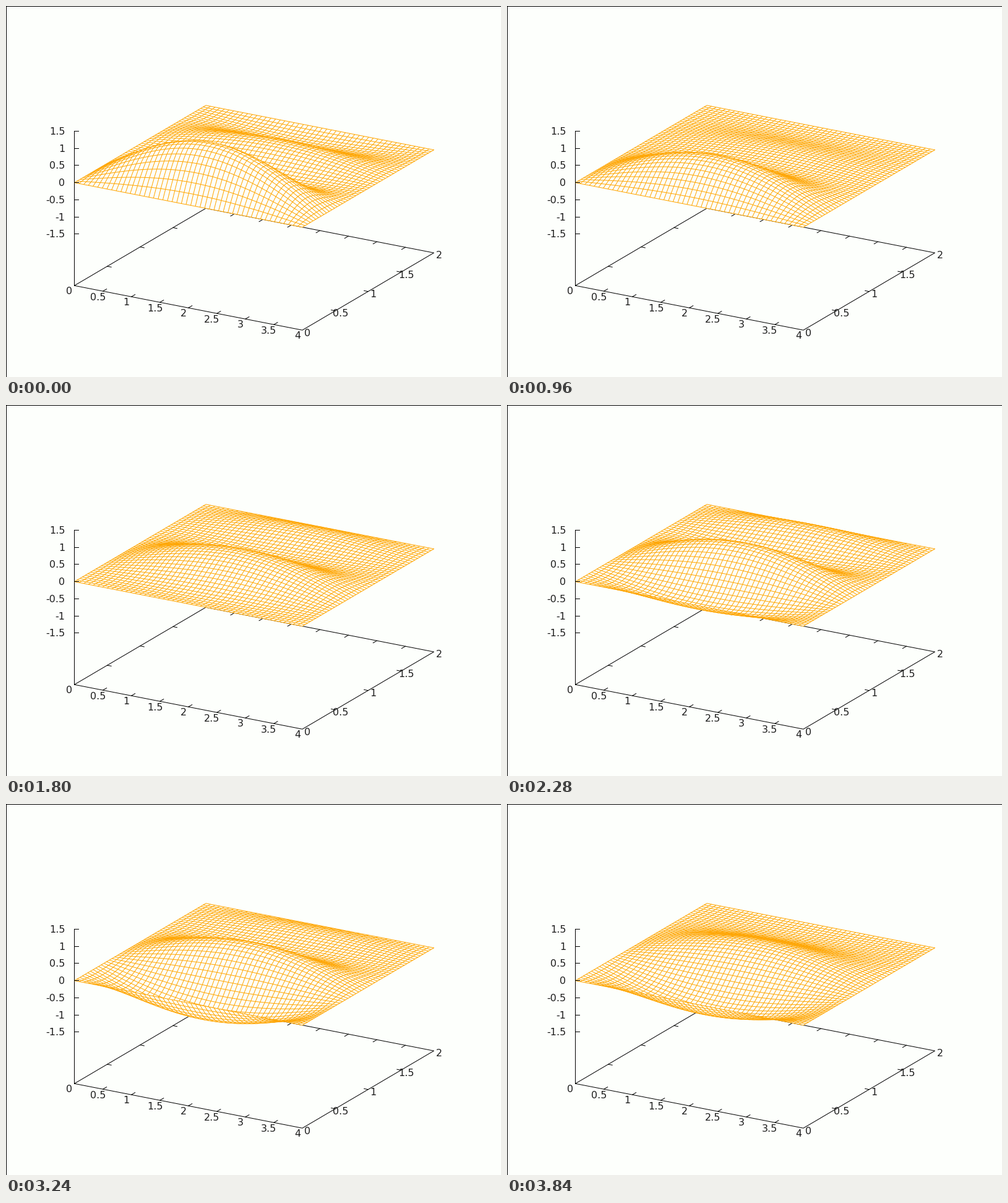
A matplotlib script for the animation above (3960 ms loop, 800 by 600 pixels).

```python
import numpy as np
import matplotlib.pyplot as plt
from matplotlib.animation import FuncAnimation
from matplotlib.collections import PolyCollection

W, H, DPI = 800, 600, 100
FRAMES, INTERVAL = 33, 120
BG, ORANGE, INK = "#fdfffc", "#ffa500", "#1c1c1c"
LINE = 72 / DPI                      # one pixel, in points
LX, LY = 4, 2                        # membrane size
SAMPLES = 50
MODES = np.arange(1, 5)
AMP = 0.44
SPEED, DT = np.sqrt(5), 0.01
ZBASE = -3


def project(x, y, z):
    """Orthographic view: plot coordinates to pixels."""
    px = 110 + 92.12 * x + 106.25 * y
    py = 285.2 + 18.0 * x - 62.5 * y - 55.5 * z
    return px, py


def height(x, y, t):
    """Sum of the first modes across y, all with one half wave along x."""
    total = 0
    for n in MODES:
        omega = SPEED * np.pi * np.hypot(1 / LX, n / LY)
        total = total + np.sin(n * np.pi * y / LY) * np.cos(omega * t)
    return AMP * np.sin(np.pi * x / LX) * total


fig = plt.figure(figsize=(W / DPI, H / DPI), dpi=DPI, facecolor=BG)
ax = fig.add_axes([0, 0, 1, 1])
# Whole numbers fall on pixel centres
ax.set_xlim(-0.5, W - 0.5)
ax.set_ylim(H - 0.5, -0.5)
ax.axis("off")


def stroke(points, color="black", zorder=1):
    xs, ys = zip(*points)
    ax.plot(xs, ys, color=color, lw=LINE, snap=False, zorder=zorder)


def tick(x, y, dx, dy):
    px, py = project(x, y, ZBASE)
    stroke([(px, py), (px + dx, py + dy)])


def label(px, py, value, ha="center"):
    ax.text(px, py + 5.8, f"{value:g}", ha=ha, va="baseline", color=INK,
            family="DejaVu Sans", fontsize=16 * LINE, zorder=4)


# Top and left border of the stage
stroke([(-1, 0), (W, 0)])
stroke([(0, -1), (0, H)])

# Base frame with inward ticks
corners = [(0, 0), (LX, 0), (LX, LY), (0, LY), (0, 0)]
stroke([project(x, y, ZBASE) for x, y in corners])

for x in np.arange(0, LX + 0.1, 0.5):
    if 0 < x < LX:
        tick(x, 0, 6, -3.5)
        tick(x, LY, -6, 3.5)
    px, py = project(x, 0, ZBASE)
    label(px - 8, py + 8.5, x)

for y in np.arange(0, LY + 0.1, 0.5):
    if 0 < y < LY:
        tick(0, y, 6.5, 1.3)
        tick(LX, y, -6.5, -1.3)
    px, py = project(LX, y, ZBASE)
    label(px + 8.5, py + 3.5, y)

# Vertical axis
stroke([project(0, 0, 1.5), project(0, 0, ZBASE)])
for z in np.arange(-1.5, 1.6, 0.5):
    px, py = project(0, 0, z)
    py = round(py)
    stroke([(px, py), (px + 7, py)], zorder=3)
    label(95, py, z, ha="right")

# Each cell is a fill followed by a line along its far and left sides.
# Rows run from far to near, so nearer cells cover those behind.
gx, gy = np.meshgrid(np.linspace(0, LX, SAMPLES), np.linspace(LY, 0, SAMPLES))
mesh = PolyCollection([], closed=False, facecolors=[BG, "none"],
                      edgecolors=["none", ORANGE], linewidths=LINE, zorder=2)
mesh.set_snap(False)
ax.add_collection(mesh, autolim=False)
stroke([project(0, 0, 0), project(LX, 0, 0), project(LX, LY, 0)], ORANGE, 2.5)


def update(i):
    p = np.stack(project(gx, gy, height(gx, gy, i * DT)), axis=-1)
    far_left, far_right = p[:-1, :-1], p[:-1, 1:]
    near_left, near_right = p[1:, :-1], p[1:, 1:]
    fill = np.stack([near_left, far_left, far_right, near_right], axis=2)
    edge = np.stack([near_left, far_left, far_right, far_right], axis=2)
    mesh.set_verts(np.stack([fill, edge], axis=2).reshape(-1, 4, 2),
                   closed=False)
    return [mesh]


anim = FuncAnimation(fig, update, frames=FRAMES, interval=INTERVAL,
                     repeat=True, repeat_delay=0)
plt.show()
```
